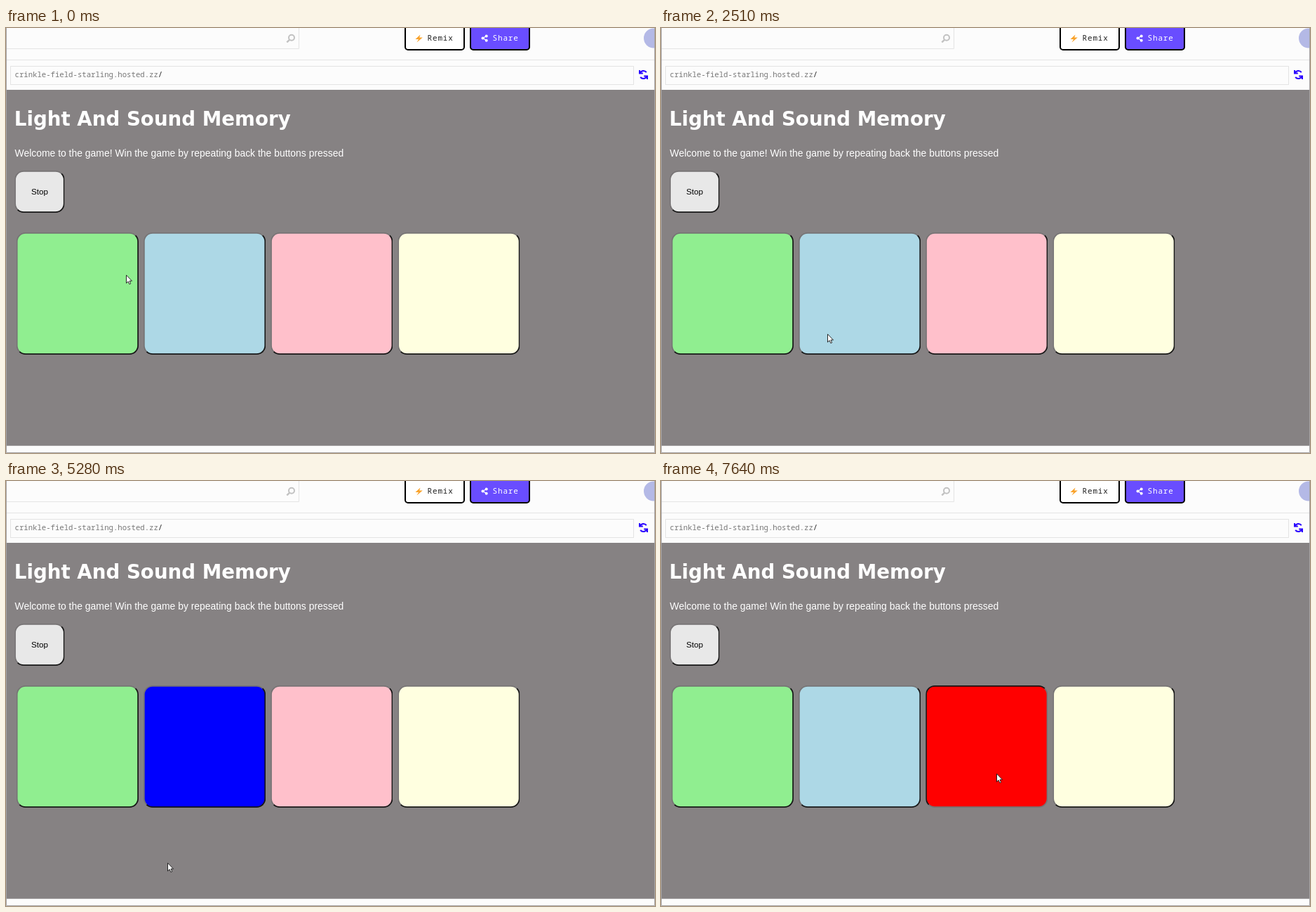
Animation of 925 by 605 pixels, one loop 8000 ms. Source, as an HTML page:

```html
<!DOCTYPE html>
<html lang="en">
<head>
<meta charset="utf-8">
<title>Memory game</title>
<style>
  html, body { margin: 0; width: 100%; height: 100%; overflow: hidden; background: #fcfcfc; }
  svg { position: absolute; left: 0; top: 0; }
  .mono { font-family: "Noto Sans Mono", "DejaVu Sans Mono", monospace; }
  .sans { font-family: "Liberation Sans", Arial, sans-serif; }
  .title { font: bold 27.7px "DejaVu Sans", Verdana, sans-serif; }

  /* The page is shown at 87.1% zoom. */
  .game { position: absolute; left: 0; top: 0; transform: scale(.871); transform-origin: 0 0; }
  .button {
    --light: #767374; --dark: #161616;
    position: absolute; box-sizing: border-box; border: 2px solid; border-radius: 15px;
    border-color: var(--light) var(--dark) var(--dark) var(--light);
  }
  .stop {
    left: 14.4px; top: 232.5px; width: 81.5px; height: 69.2px; background: #e8e8e8;
    display: flex; align-items: center; justify-content: center; font-size: 13.333px; color: #000;
  }
  .pad { left: calc(16.5px + 208px * var(--i)); top: 333.6px; width: 200px; height: 200px; }
  .green { --i: 0; background: lightgreen; }
  .blue { --i: 1; background: lightblue; animation: blue-light 8s step-end infinite, blue-press 8s step-end infinite; }
  .pink { --i: 2; background: pink; animation: red-press 8s step-end infinite; }
  .yellow { --i: 3; background: lightyellow; }
  .cursor { animation: move 8s step-end infinite; }

  @keyframes blue-light {
    0%, 15%, 31.375%, 55.75%, 71.375%, 92.5%, 100% { background: lightblue; }
    1.875%, 16.5%, 42.25%, 59.125%, 78% { background: blue; }
  }
  @keyframes blue-press {
    0%, 31.375%, 92.5%, 100% { border-color: var(--light) var(--dark) var(--dark) var(--light); }
    16.5%, 78% { border-color: var(--dark) var(--light) var(--light) var(--dark); }
  }
  @keyframes red-press {
    0% { background: pink; }
    95.5%, 100% { background: red; border-color: var(--dark) var(--light) var(--light) var(--dark); }
  }
  @keyframes move {
    0% { transform: translate(171px, 351px); }
    1.875% { transform: translate(186px, 388px); }
    3.375% { transform: translate(202px, 419px); }
    5.25% { transform: translate(231px, 460px); }
    7.125% { transform: translate(234px, 464px); }
    11.875% { transform: translate(236px, 452px); }
    13.375% { transform: translate(237px, 440px); }
    15% { transform: translate(237px, 435px); }
    33.25% { transform: translate(230px, 530px); }
    35.125% { transform: translate(231px, 542px); }
    38.625% { transform: translate(231px, 543px); }
    66% { transform: translate(230px, 543px); }
    73.125% { transform: translate(230px, 519px); }
    75% { transform: translate(243px, 462px); }
    76.5% { transform: translate(260px, 424px); }
    92.5% { transform: translate(330px, 422px); }
    94%, 100% { transform: translate(478px, 416px); }
  }
</style>
</head>
<body>
<svg width="925" height="605" viewBox="0 0 925 605">
  <rect width="925" height="605" fill="#fcfcfc"/>

  <!-- toolbar -->
  <g fill="none" stroke="#e4e4e4">
    <path d="M0 29.5H417.5V0M0 45.5H925"/>
    <rect x="6.5" y="54.5" width="888" height="26"/>
  </g>
  <g fill="none" stroke="#c2c2c2" stroke-width="2">
    <circle cx="407" cy="13.7" r="4"/>
    <path d="M404 16.8L400.3 20.4" stroke-width="2.4"/>
  </g>
  <g stroke="#000" stroke-width="2">
    <rect x="569" y="-9" width="84" height="40" rx="4" fill="#fff"/>
    <rect x="662" y="-9" width="84" height="40" rx="4" fill="#694dff"/>
  </g>
  <path d="M590.5 9.5L583.5 16H588L585.5 20.5L593.8 13.6H589.2Z" fill="#f9a32b"/>
  <g fill="#fff" stroke="#fff">
    <path d="M685 11.2L679.5 14.5L685 17.8" fill="none" stroke-width="1.2"/>
    <g stroke="none">
      <circle cx="679.6" cy="14.5" r="2.1"/>
      <circle cx="684.7" cy="11.4" r="2"/>
      <circle cx="684.7" cy="17.7" r="2"/>
    </g>
  </g>
  <g class="mono" font-size="11" letter-spacing=".85">
    <text x="600.5" y="18.3" fill="#222">Remix</text>
    <text x="693.5" y="18.3" fill="#fff">Share</text>
  </g>
  <circle cx="923" cy="14.5" r="14" fill="#b4b9e6"/>
  <text class="mono" x="12.5" y="70.3" font-size="10.65" fill="#777">crinkle-field-starling.hosted.zz<tspan fill="#222">/</tspan></text>
  <g fill="none" stroke="#2800ff" stroke-width="2">
    <path d="M903.6 64.6A5.2 5.2 0 0 1 912.8 63.2M913.4 68.4A5.2 5.2 0 0 1 904.2 69.8"/>
    <path d="M903 60V64.6H907.8M914 73V68.4H909.2"/>
  </g>

  <!-- game page -->
  <rect y="88" width="925" height="506" fill="#868283"/>
  <text class="title" x="11.8" y="138.7" fill="#fff">Light And Sound Memory</text>
  <text class="sans" x="12.5" y="183" font-size="13.93" fill="#fff">Welcome to the game! Win the game by repeating back the buttons pressed</text>
  <path d="M.5 0V604.5H924.5V0M0 594.5H925" fill="none" stroke="#a5a3a4"/>
</svg>

<div class="game">
  <div class="button stop sans">Stop</div>
  <div class="button pad green"></div>
  <div class="button pad blue"></div>
  <div class="button pad pink"></div>
  <div class="button pad yellow"></div>
</div>

<svg class="cursor" width="12" height="16">
  <path d="M.5 .8V12.2L3.1 9.8L4.9 13.7L6.7 12.9L5 9.1H8.5Z" fill="#fff" stroke="#111" stroke-width=".9"/>
</svg>
</body>
</html>
```
